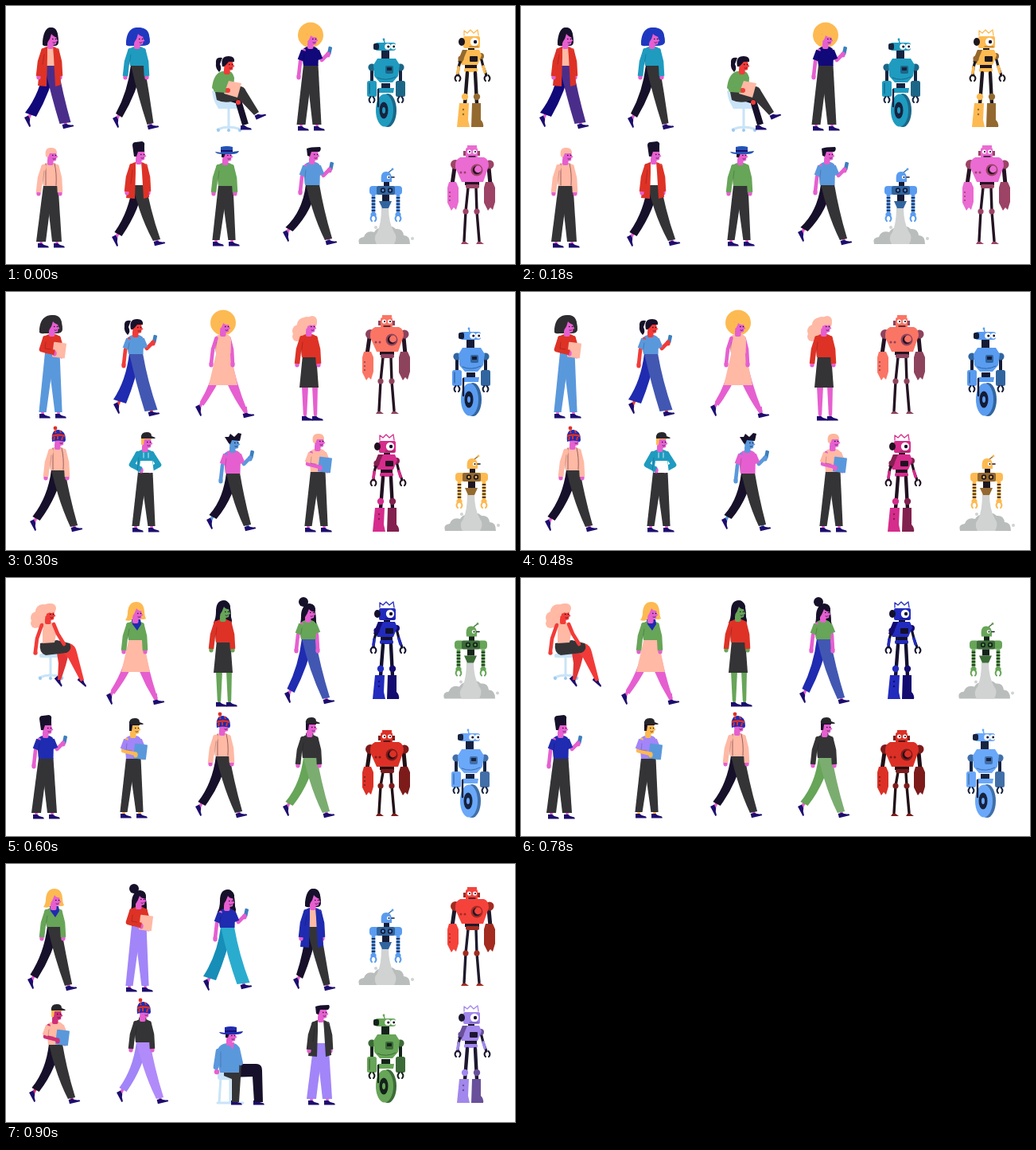
Recreate the animation shown at these times as an HTML page. Size 640x324 px, loop 1.2 s.

```html
<!DOCTYPE html>
<html lang="en">
<head>
<meta charset="utf-8">
<title>People and robots</title>
<style>
html, body { margin: 0; width: 100%; height: 100%; overflow: hidden; background: #fff; }
svg { display: block; width: 100%; height: 100%; }
</style>
</head>
<body>
<svg id="stage" viewBox="0 0 640 324"></svg>
<script>
const PINK = '#e65fd0', RED = '#de3226', FLUSH = '#f23b38', DARK = '#343436', INK = '#17102a',
  NAVY = '#1c0d6e', PEACH = '#ffb9a5', GREEN = '#67a558', TEAL = '#1f9bc0', BLUE = '#5a98dc',
  ROYAL = '#1f2bb0', VIOLET = '#a285f8', GOLD = '#fdba52', SKY = '#c9e4f8', WHITE = '#fff';

// Shape helpers
const D = (d, c) => `<path d="${d}" fill="${c}"/>`;
const L = (d, c, w, cap = 'round') =>
  `<path d="${d}" fill="none" stroke="${c}" stroke-width="${w}" stroke-linecap="${cap}" stroke-linejoin="round"/>`;
const E = (x, y, rx, c, ry = rx) => `<ellipse cx="${x}" cy="${y}" rx="${rx}" ry="${ry}" fill="${c}"/>`;
const R = (x, y, w, h, c, r = 0) => `<rect x="${x}" y="${y}" width="${w}" height="${h}" rx="${r}" fill="${c}"/>`;
const at = (x, y, s, a = 0) => `<g transform="translate(${x} ${y}) rotate(${a})">${s}</g>`;

// Heads: origin at the base of the neck; each hair style gives [behind, in front]
const fringe = c => D('M-6-6Q-10-24 2-24Q10-23 9-14Q4-13 1-17Q-1-11-4-7Z', c);
const bob = (c, l, r) => [
  D(`M0-25Q${l + 2}-25 ${l}-8L${l}-3Q${l + 3}-1 ${l + 6}-2L5-2Q${r}-2 ${r}-7Q${r}-25 0-25Z`, c),
  D(`M-5-6Q-9-25 1-25Q${r - 1}-25 ${r - 1}-13Q5-12 1-17Q0-11-4-6Z`, c)];
const flip = c => D('M1-25Q-9-25-10-12Q-10-6-13-2Q-7 0-4-3L5-4Q9-2 13-4Q11-8 11-13Q10-25 1-25Z', c);
const longHair = c => D('M1-25Q-9-25-9-11Q-9-2-12 3Q-13 9-6 10Q4 10 7 6Q13 4 10-4Q10-25 1-25Z', c);
const hair = {
  bob: c => bob(c, -10, 10),
  wide: c => bob(c, -14, 16),
  left: c => bob(c, -16, 13),
  flip: c => [flip(c), fringe(c)],
  long: c => [longHair(c), fringe(c)],
  bun: c => [E(-6, -24, 6, c) + at(0, 5, longHair(c)), at(0, 2, fringe(c))],
  afro: c => [E(0, -15.5, 16, c), D('M-5-7Q-8-22 6-21Q11-18 8-13Q3-12 0-15Q-1-10-5-7Z', c)],
  curls: c => [E(-6, -13, 9, c) + E(-13, -5, 8, c) + E(-8, 1, 7, c) + E(-15, 2, 6, c) + E(2, -15, 8, c),
    E(-3, -17, 6, c) + E(4, -18, 6, c) + E(-6, -11, 4, c)],
  pony: c => [D('M-6-19Q-15-21-14-12Q-15-6-10-1Q-6-5-9-11Z', c), D('M-6-8Q-9-21 2-21Q10-21 9-14L2-14Q-1-10-4-8Z', c)],
  bald: c => ['', D('M-6-9Q-8-20 0-20Q8-21 8-13L-1-13L-3-8Z', c)],
  tall: c => ['', D('M-6-8L-8-22Q-8-26-4-26L4-27Q8-26 7-22L7-14L-1-14L-3-8Z', c)],
  short: c => ['', D('M-6-9L-7-18Q-3-20 10-20Q12-17 9-14L-1-14L-3-8Z', c)],
  spiky: c => ['', D('M-5-10L-10-18L-5-18L-3-22L2-18L7-23L11-22L9-13L-1-14L-3-9Z', c)],
  hat: c => ['', D('M-5-8L-5-14L0-13L-2-8Z', INK) + D('M-6-14L-6-21Q2-23 9-21L9-15L17-16Q16-12 8-12L-4-12Q-12-12-13-15Z', c) + R(-6, -17, 15, 2, NAVY)],
  cap: c => ['', D('M-5-7L-5-16L8-16L8-14L-1-14L-2-7Z', c) + D('M-5-15Q-6-23 2-23Q8-23 8-18L13-16L12-15L-5-15Z', '#26262b')],
  beanie: c => [E(-3, -25, 2.4, RED), D('M-7-8Q-9-23 1-23Q10-22 10-10L9-8Q0-11-7-8Z', c) +
    L('M-7-15Q1-18 9-15', RED, 2.6, 'butt') + L('M-4-22L-2-19M3-22L4-19M-5-10L-4-14M0-11L0-15M5-10L6-14', RED, 2, 'butt')]
};
const face = c => R(-4, -7, 7.5, 9, c, 2) +
  D('M-5-17L7-17L7.5-11L9.5-8L7.5-7.5L7-4Q2-2-2-4Q-5-7-5-17Z', c) +
  E(2.8, -10.5, .8, INK) + E(6.5, -10.5, .8, INK) + L('M3-6Q5-5 6-6.3', INK, .7);
const head = (style, c, skin) => {
  const [back, front] = hair[style](c);
  return [back, face(skin) + front];
};

// Legs
const shoe = D('M-4-2L1-2Q4 1 9 1.5Q10.5 3.5 9 3.5L-4 3.5Z', NAVY);
const walk = (w, c, cb, skin, [bx, by, fx, fy], k) =>
  L(`M${bx + 4} ${by - 9}L${bx} ${by}M${fx - 1} ${fy - 9}L${fx} ${fy}`, skin, 3.6, 'butt') +
  at(bx, by, shoe, 62) + at(fx, fy + 1, shoe, -14) +
  D(`M-8 ${w}L7 ${w}Q0 ${w + 34} ${bx + k + 3} ${by - 3}L${bx - k + 3} ${by - 8}Q-12 ${w + 34} -8 ${w}Z`, cb) +
  D(`M-8 ${w}L9 ${w}Q15 ${w + 35} ${fx + k - .5} ${fy - 3}L${fx - k - .5} ${fy - 1}Q1 ${w + 40} -8 ${w}Z`, c);
const stand = (w, c, skin, k, h, bare) => {
  const a = bare ? -5 : -12, b = 8, cut = h - 4;
  return L(`M${a} ${cut - 2}L${a} ${h}M${b} ${cut - 2}L${b} ${h}`, skin, 3.6, 'butt') + at(a, h, shoe) + at(b, h, shoe) +
    D(`M-9 ${w}L${bare ? -1 : 3} ${w}L${a + k} ${cut}L${a - k} ${cut}Z`, c) +
    D(`M${bare ? 4 : -6} ${w}L${bare ? 11 : 9.5} ${w}L${b + k} ${cut}L${b - k} ${cut}Z`, c);
};

// Arms
const arm = (pts, cut, kind, c, skin) => {
  const d = 'M' + pts.map(p => p.join(' ')).join('L'), end = pts[pts.length - 1];
  const hand = E(end[0], end[1] + 1, 2.7, skin, 3.6);
  if (kind == 'bare') return L(d, skin, 4.6) + hand;
  if (kind == 'tee') return L(d, skin, 4.6) + hand + L(`M${pts[0].join(' ')}L${cut.join(' ')}`, c, 7, 'butt');
  return hand + L(d, c, 6.6, 'butt') + E(pts[0][0], pts[0][1], 3.3, c);
};
const leftDown = [[-8.5, 4], [-13, 18], [-15, 36]], rightDown = [[7.5, 4], [11, 18], [12, 36]];
const poses = {
  down: [leftDown, rightDown],
  phone: [leftDown, [[7.5, 4], [14, 16], [22, 8]]],
  book: [[[-8.5, 4], [-13, 18], [3, 22]], [[7.5, 4], [11, 16], [12, 25]]],
  pocket: [[[-9, 4], [-17, 18], [-5, 24]], [[8, 4], [17, 18], [6, 24]]]
};

// A person: x, y is the base of the neck
function person(x, y, o) {
  const { w = y > 170 ? 27 : 22, skin = PINK, top, kind = 'long', pose = 'down', legs = DARK, back = INK,
    feet = [-28, 91, 19, 98], k = 4.6, under = WHITE, skirt, hem = 63 } = o;
  const [hb, hf] = head(o.head, o.hair || INK, skin);
  const [la, ra] = poses[pose], sleeve = kind == 'jacket' ? 'long' : kind;
  let s = hb;
  s += o.still ? stand(skirt ? hem - 2 : w, legs, skin, k, o.still, skirt) : walk(w, legs, back, skin, feet, k);
  if (skirt) s += D(`M-8 ${w - 2}L9 ${w - 2}L${o.flare || 12} ${hem}L${-(o.flare || 12)} ${hem}Z`, skirt);
  s += arm(ra, [12, 15], sleeve, top, skin);
  s += D(`M-4-1Q-10 0-11 7L-9 ${w + 1}L9.5 ${w + 1}L10 7Q10 0 4-1Z`, kind == 'jacket' ? under : top);
  if (kind == 'jacket') {
    const b = w + 18 + (o.extra || 0);
    s += D(`M-4-1Q-11 0-12 8L-16 ${b - 1}L-5 ${b}L-4 12Z`, top) + D(`M3-1Q10 0 11 8L13 ${b - 2}L6 ${b}L4 12Z`, top);
  }
  if (o.braces) s += L(`M-6 0L-6 ${w}M5 0Q8 12 7 ${w}`, '#7b4a4a', .8);
  if (o.scarf) s += D('M-5-3L6-3L7 3L2 11L-4 3Z', ROYAL);
  if (o.neck) s += R(-5, -4, 9.5, 6, top, 2);
  if (o.pouch) s += D('M-6 13L9 13L11 28L-8 28Z', WHITE) + L('M-2 3L-2 9M4 3L4 9', WHITE, .8);
  if (pose == 'book') s += at(9, 19, R(-8, -9.5, 16, 19, o.book, 1), 7);
  if (pose == 'phone') s += at(24, 4, R(-2.3, -5, 4.6, 10, '#3b7fbd', 1), 12) + E(22, 8, 2.6, skin);
  s += arm(la, [-13, 16], sleeve, top, skin);
  s += L(pose == 'book' ? 'M-8 9L-9 17L-2 18' : `M-8 9L-10 ${w - 1}`, '#0005', .6);
  return at(x, y, s + hf);
}

// Seated people
const stool = (x, y, h) => R(x - 14, y, 28, 5, SKY, 2) + R(x - 1.5, y, 3, h, SKY) +
  L(`M${x - 14} ${y + h + 1}Q${x} ${y + h - 5} ${x + 15} ${y + h + 1}`, SKY, 3) +
  [-13, 0, 14].map(d => E(x + d, y + h + 2, 2, '#9cc9ee')).join('');
const seatedWriter = () => {
  const [hb, hf] = head('pony', INK, FLUSH);
  return stool(280, 124, 30) + D('M259 107Q268 104 288 112L288 129L268 129Q261 122 259 107Z', SKY) +
    at(299, 152, shoe) + at(317, 138, shoe, -24) +
    L('M273 113L292 119L301 149', INK, 8, 'butt') +
    D('M263 108L288 101Q299 99 302 107L318 133L312 137L293 117Q277 124 265 118Z', DARK) +
    D('M272 82Q261 84 259 103L264 108L286 107L287 90Q285 82 279 81Z', GREEN) +
    at(278, 84, hb + hf) + D('M280 94L296 97L291 115L274 110Z', PEACH) +
    L('M264 95L264 105L277 106', GREEN, 6) + E(279, 106, 3, FLUSH) + E(292, 121, 3, FLUSH);
};
const seatedWoman = () => {
  const [hb, hf] = head('curls', PEACH, FLUSH);
  return stool(56, 95, 29) + at(52, 55, hb) + at(66, 127, shoe, 50) + at(95, 128, shoe, 40) +
    D('M64 94L80 91L75 110L69 128L65 128L66 107Z', '#e23434') +
    D('M64 87L80 82Q87 84 89 93L98 128L94 130L78 100Z', FLUSH) +
    D('M43 82L64 78L80 82Q84 90 76 94L50 97Q41 94 43 82Z', DARK) +
    D('M48 56L60 56L64 65L61 81L46 82L46 66Z', PEACH) +
    L('M60 58L65 70L73 83', FLUSH, 4.6) + L('M45 59L39 76L37 92', FLUSH, 4.6) + E(37, 94, 2.7, FLUSH) + at(53, 56, hf);
};
const seatedMan = () => {
  const [, hf] = head('hat', ROYAL, PINK);
  return R(266, 262, 26, 9, SKY, 3) + L('M270 268L268 300M282 268L282 299M266 300L298 300', SKY, 3) +
    at(287, 299, shoe) + at(315, 299, shoe) +
    D('M278 251L314 251Q322 251 322 259L323 299L312 299L310 267L280 268Z', INK) +
    D('M274 253L296 253L293 299L284 299L284 270L274 266Z', DARK) +
    D('M278 225Q266 226 264 240L269 262L293 262L294 235Q293 226 286 225Z', BLUE) +
    D('M279 224L287 224L285 233Z', PINK) + L('M267 235L264 255', BLUE, 6.6) + L('M291 232L295 250', BLUE, 6) +
    E(265, 261, 3.2, PINK) + L('M270 236L270 255', '#0005', .6) + at(281, 226, hf);
};

// Robots: colours are main, shade, ink
const eye = (x, y, r) => E(x, y, r, WHITE) + E(x + r * .2, y, r * .42, INK);
const claw = (x, y, c) => L(`M${x - 1.5} ${y}Q${x - 5} ${y + 4} ${x - 2} ${y + 7}M${x + 1.5} ${y}Q${x + 5} ${y + 4} ${x + 2} ${y + 7}`, c, 2);

function wheelBot(dx, dy, [c, s, k]) {
  const side = (x, fill) => L(`M${x} 78L${x} 95`, k, 4) + E(x, 77, 4.6, s) + R(x - 6, 94, 12, 20, fill, 2.5) + claw(x, 114, k);
  return at(dx, dy,
    L('M476 46L475 42', c, 1.5) + E(475, 42, 1.4, c) +
    R(472, 54, 10, 13, k) + R(464, 46, 26, 10, c, 3) + R(462, 47, 7, 8, k, 2) + eye(480, 51, 3.8) + eye(487, 51, 3.4) +
    side(460, c) + side(496, s) + L('M457 97L457 110', s, 1.4) +
    D('M467 66L490 66L495 74L493 88L486 96L470 96L463 88L462 74Z', c) +
    R(477, 75, 10, 10, s, 2) + R(479, 77, 6, 4, k) + L('M467 90Q478 95 490 89', s, 1) +
    R(472, 97, 11, 6, k) + D('M468 103L488 103L487 109L468 109Z', c) +
    E(480, 131, 11, s, 21) + E(476, 131, 11, c, 20.5) + E(475, 131, 5.5, k, 10.5) + E(475, 131, 2, c, 4) +
    L('M468 105L468 126', k, 2.4));
}

function walkerBot(dx, dy, [c, s, k]) {
  return at(dx, dy,
    L('M576 37L576 31L580 34L584 30L588 34L593 30L594 37', c, 1.3) +
    R(581, 52, 8, 5, k) + R(575, 38, 21, 15, c, 2) + E(573, 45, 4, k, 5) + eye(589, 45, 5.2) + L('M583 51L594 51', s, 1) +
    L('M597 64L600 76L604 87', k, 3.2) + E(597, 63, 4, s) + L('M600 76L602 83', c, 3.6) + claw(605, 87, k) +
    D('M574 55L595 55L598 62L593 74L573 74L569 67Z', c) + D('M574 55L580 55L573 72L568 70Z', s) +
    R(583, 63, 10, 7, k, 1) + R(577, 74, 15, 6, k) + R(576, 78, 17, 5, c, 2) +
    L('M572 66L569 77L568 87', k, 3.2) + E(572, 66, 3.6, s) + L('M569 77L568 84', c, 3.6) + claw(568, 87, k) +
    L('M580 84L577 123', k, 4.4) + L('M590 84L592 123', k, 4.4) +
    E(577, 114, 4.2, c) + E(592, 114, 4.2, s) +
    D('M586 122L597 122L597 143Q601 147 600 152L585 152Z', s) +
    D('M570 122L582 122L581 143L583 152L567 152Z', c) +
    E(575, 130, 1.2, s) + E(575, 136, 1.2, s));
}

function jetBot(dx, dy, [c, s, k]) {
  let arms = '';
  for (const x of [462, 493]) {
    arms += L(`M${x} 237L${x} 263`, c, 4.6, 'butt');
    for (let y = 240; y < 260; y += 4) arms += R(x - 2.3, y, 4.6, 1.5, k);
    arms += R(x - 3.5, 260, 7, 4, c, 1) + claw(x, 263, c);
  }
  return at(dx, dy,
    E(465, 278, 2, '#d0d3d2') + E(511, 292, 2, '#d0d3d2') +
    D('M444 299Q441 291 450 290Q453 281 463 284Q468 276 476 281Q483 273 490 280Q499 279 500 288Q508 288 508 299Z', '#b9bdbc') +
    D('M472 253L481 253Q481 272 488 284Q493 290 488 299L466 299Q461 291 467 284Q472 273 472 253Z', '#d0d3d2') +
    L('M481 209L486 205', s, 1.3) + E(486, 205, 1.4, c) + R(475, 220, 7, 7, k) +
    D('M472 221Q470 208 478 208Q486 208 485 221Z', c) + E(481, 215, 2.2, WHITE) + E(481.5, 215, 1.1, k) + L('M485 215L488 215', k, 1.6) +
    arms + R(457, 226, 12, 11, c, 4) + R(486, 226, 12, 11, c, 4) + R(466, 226, 23, 11, s, 2) +
    E(474, 231.5, 3.2, k) + E(483, 231.5, 3.2, k) + E(474, 231.5, 1.4, c) + E(483, 231.5, 1.4, c) +
    R(473, 237, 9, 8, k) + D('M469 245L485 245L481 254L473 254Z', s));
}

function heavyBot(dx, dy, [c, s, k], drop = 0) {
  const hip = 228 + drop, knee = 258 + (drop ? 3 : 0);
  const leg = (x, kx, fx) => L(`M${x} ${hip}L${kx} ${knee}L${fx} 295`, k, 3.4) + E(kx, knee, 3.6, s) + D(`M${fx - 4} 299L${fx - 2} 296L${fx + 2} 296L${fx + 6} 299Z`, s);
  const fore = (x, fill) => D(`M${x - 5} 221L${x + 4} 221L${x + 7} 228L${x + 7} 246L${x + 4} 256L${x + 1} 253L${x - 2} 257L${x - 7} 247L${x - 7} 228Z`, fill);
  return at(dx, dy, leg(581, 578, 576) + leg(591, 592, 595) + at(0, drop,
    R(580, 175, 12, 3, c) + R(583, 191, 8, 5, k) + R(578, 178, 15, 14, c, 2) + R(575, 182, 3, 6, s) + R(593, 182, 3, 6, s) +
    eye(582.5, 183, 2.6) + eye(589.5, 183, 2.6) + L('M582 189L590 189', k, 1.3) +
    L('M564 203L561 224M607 203L609 224', k, 5) +
    E(565, 199, 6, s) + E(608, 199, 5.5, s) +
    D('M571 190L601 190Q607 192 607 201L600 221L573 221L565 203Q564 193 571 190Z', c) +
    E(592, 206, 7.5, s) + E(592, 206, 5.2, k) + E(593.5, 205, 4.4, c) +
    E(572, 209, 1.5, s) + E(577, 209, 1.5, s) + R(577, 221, 18, 4, k) + R(578, 224, 17, 5, s, 2) +
    fore(562, c) + E(558, 234, 1.1, s) + E(558, 239, 1.1, s) + E(558, 244, 1.1, s) + fore(608, s)));
}

const paint = {
  teal: [TEAL, '#1b6687', '#17233f'], gold: [GOLD, '#94692f', '#1d1720'], blue: ['#5a9cf0', '#31659f', '#141c36'],
  pink: ['#ea6bd2', '#9c4366', '#241323'], salmon: ['#fb7565', '#8e435c', '#241323'], sky: ['#6aa8fa', '#416fa8', '#17233f'],
  magenta: ['#d62c8c', '#82204f', '#211020'], royal: ['#222bbd', '#140b70', '#12102c'], green: ['#67a558', '#3c6b38', '#14231a'],
  red: ['#dc3026', '#7d1b1b', '#211016'], scarlet: ['#f5433c', '#a32b20', '#1d1a2d'], violet: ['#a287ec', '#69509b', '#1d1730']
};

const scenes = [
  person(56, 52, { head: 'bob', top: RED, kind: 'jacket', under: PEACH, extra: 9, legs: '#4a2d8a', back: '#11087a', k: 7, feet: [-28, 90, 19, 97] }) +
  person(165, 52, { head: 'wide', hair: '#1f38c0', top: TEAL, feet: [-26, 91, 17, 98], k: 4 }) +
  seatedWriter() +
  person(383, 52, { head: 'afro', hair: GOLD, top: '#11087a', kind: 'tee', pose: 'phone', still: 101, k: 5.5 }) +
  wheelBot(0, 0, paint.teal) + walkerBot(0, 0, paint.gold) +
  person(56, 198, { head: 'bald', hair: PEACH, top: PEACH, braces: 1, still: 102, k: 6 }) +
  person(167, 197, { head: 'tall', top: RED, kind: 'jacket', feet: [-29, 95, 23, 99] }) +
  person(276, 198, { head: 'hat', hair: '#2453b5', top: GREEN, still: 100 }) +
  person(385, 197, { head: 'short', top: BLUE, kind: 'tee', pose: 'phone', feet: [-32, 89, 21, 98] }) +
  jetBot(0, 0, paint.blue) + heavyBot(0, 0, paint.pink),

  person(58, 54, { head: 'left', hair: '#2e2c30', top: RED, pose: 'book', book: PEACH, legs: BLUE, still: 101 }) +
  person(163, 55, { head: 'pony', skin: FLUSH, top: BLUE, kind: 'tee', pose: 'phone', legs: '#4257b2', back: ROYAL, k: 8, feet: [-23, 88, 20, 96] }) +
  person(273, 54, { head: 'afro', hair: GOLD, top: PEACH, kind: 'bare', legs: PINK, back: PINK, skirt: PEACH, flare: 18, k: 2.2, feet: [-30, 92, 29, 99] }) +
  person(381, 54, { head: 'curls', hair: PEACH, top: RED, w: 27, legs: PINK, skirt: DARK, hem: 66, k: 2.2, still: 104 }) +
  heavyBot(-107, -146, paint.salmon) + wheelBot(107, 4, paint.blue) +
  person(65, 196, { head: 'beanie', hair: ROYAL, top: PEACH, braces: 1, feet: [-30, 94, 21, 100] }) +
  person(175, 199, { head: 'cap', hair: GOLD, top: TEAL, pose: 'pocket', pouch: 1, still: 99 }) +
  person(285, 200, { head: 'spiky', skin: BLUE, top: PINK, kind: 'tee', pose: 'phone', feet: [-28, 88, 19, 95] }) +
  person(392, 198, { head: 'bald', hair: '#fdb79a', top: PEACH, kind: 'tee', pose: 'book', book: BLUE, still: 100 }) +
  walkerBot(-106, 149, paint.magenta) + jetBot(108, 1, paint.gold),

  seatedWoman() +
  person(163, 55, { head: 'flip', hair: GOLD, top: GREEN, scarf: 1, legs: PINK, back: PINK, skirt: PEACH, flare: 18, k: 2.2, feet: [-32, 94, 26, 99] }) +
  person(273, 53, { head: 'long', skin: GREEN, top: RED, w: 27, legs: GREEN, skirt: DARK, hem: 66, k: 2.2, still: 105 }) +
  person(380, 54, { head: 'bun', top: GREEN, kind: 'tee', legs: '#4257b2', back: ROYAL, feet: [-25, 93, 23, 99] }) +
  walkerBot(-106, 0, paint.royal) + jetBot(107, -147.5, paint.green) +
  person(50, 199, { head: 'tall', top: ROYAL, kind: 'tee', pose: 'phone', still: 100, k: 6 }) +
  person(160, 199, { head: 'cap', hair: INK, skin: GOLD, top: VIOLET, kind: 'tee', pose: 'book', book: BLUE, still: 99 }) +
  person(272, 196, { head: 'beanie', hair: ROYAL, top: PEACH, braces: 1, feet: [-29, 93, 21, 100] }) +
  person(382, 198, { head: 'cap', hair: INK, top: DARK, neck: 1, legs: '#7bad70', back: GREEN, feet: [-29, 91, 21, 98] }) +
  heavyBot(-107, 0, paint.red, 16) + wheelBot(106, 149, paint.sky),

  person(60, 56, { head: 'flip', hair: GOLD, top: GREEN, scarf: 1, feet: [-28, 91, 19, 98] }) +
  person(167, 55, { head: 'bun', top: RED, pose: 'book', book: PEACH, legs: VIOLET, still: 102 }) +
  person(278, 57, { head: 'long', top: ROYAL, kind: 'tee', pose: 'phone', legs: '#2aaccf', back: '#168eb8', k: 8, feet: [-25, 92, 21, 95] }) +
  person(386, 56, { head: 'bob', top: ROYAL, kind: 'jacket', under: PEACH, extra: 9, k: 4, feet: [-20, 91, 18, 98] }) +
  jetBot(0, -147, paint.blue) + heavyBot(0, -146, paint.scarlet) +
  person(62, 199, { head: 'cap', hair: GOLD, skin: '#cf2f78', top: PEACH, kind: 'tee', pose: 'book', book: BLUE, feet: [-28, 90, 21, 97] }) +
  person(172, 196, { head: 'beanie', hair: ROYAL, top: DARK, neck: 1, legs: '#b18bfa', back: VIOLET, feet: [-28, 93, 22, 100] }) +
  seatedMan() +
  person(396, 197, { head: 'short', top: DARK, kind: 'jacket', legs: VIOLET, still: 102, k: 6 }) +
  wheelBot(0, 148, paint.green) + walkerBot(0, 148, paint.violet)
];

const stage = document.getElementById('stage');
stage.innerHTML = scenes.map(s => `<g visibility="hidden">${s}</g>`).join('');
const groups = [...stage.children], HOLD = 300, start = performance.now();

function show() {
  const now = Math.floor((performance.now() - start) / HOLD) % groups.length;
  groups.forEach((g, i) => g.setAttribute('visibility', i == now ? 'visible' : 'hidden'));
  requestAnimationFrame(show);
}
show();
</script>
</body>
</html>
```
